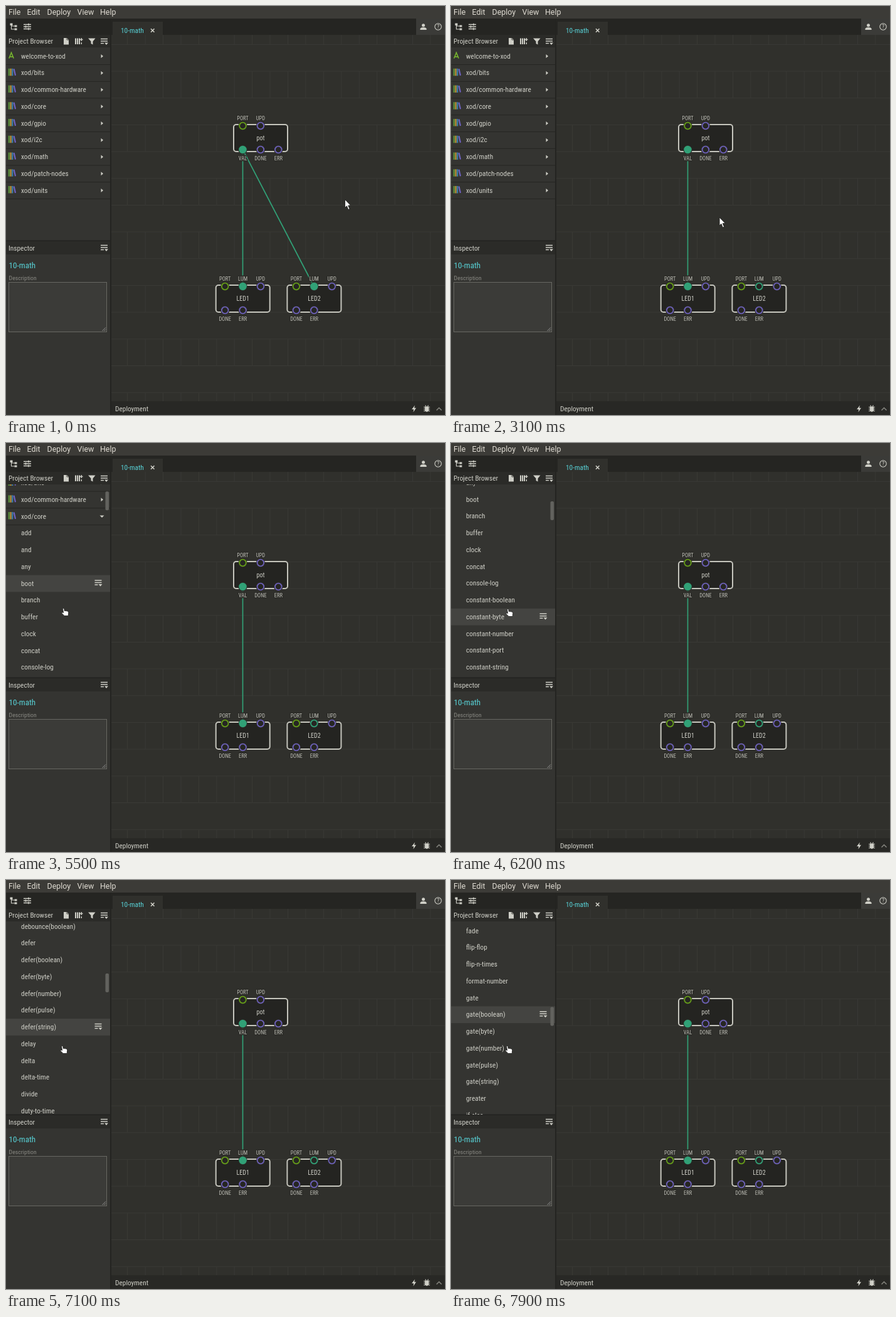
Write an HTML page that moves like this. It is 700 px wide and 652 px high and loops after 8000 ms.

```html
<!DOCTYPE html>
<html lang="en">
<head>
<meta charset="utf-8">
<title>Patch editor</title>
<style>
  html, body { margin: 0; width: 100%; height: 100%; overflow: hidden; background: #30302c; }
  svg { display: block; width: 700px; height: 652px; }
  text { font-family: "Roboto Condensed", Roboto, sans-serif; font-stretch: condensed; fill: #cfcfc7; white-space: pre; }
  .menu { font-family: Roboto, sans-serif; font-stretch: normal; fill: #dfdbd2; }
  .mid { text-anchor: middle; }
  .pin { fill: #bdbdb5; paint-order: stroke; stroke: #2d2d29; stroke-width: 3px; }
  .ico { fill: #cfcfc7; }
  .line { fill: none; stroke: #cfcfc7; stroke-width: 1.4; }
</style>
</head>
<body>
<svg id="stage" viewBox="0 0 700 652"></svg>
<script>
const ROW = 26.75, LOOP = 8000;
const GREEN = '#31a177', LIME = '#659d18', PURPLE = '#6c60b8', CYAN = '#58d3d8';

// Condensed text keeps the advance width of regular text of the nominal size.
const pen = document.createElement('canvas').getContext('2d');
const widthOf = font => (pen.font = font, pen.measureText('Deployment hardware').width);
const grow = widthOf('100px Roboto, sans-serif') /
  widthOf('condensed 100px "Roboto Condensed", Roboto, sans-serif');

const rect = (x, y, w, h, fill, more = '') =>
  `<rect x="${x}" y="${y}" width="${w}" height="${h}" fill="${fill}" ${more}/>`;
const path = (d, more = 'class="ico"') => `<path d="${d}" ${more}/>`;
const at = (x, y, body) => `<g transform="translate(${x} ${y})">${body}</g>`;
const text = (x, y, size, str, more = '') =>
  `<text x="${x}" y="${y}" font-size="${(size * grow).toFixed(2)}" ${more}>${str}</text>`;
const dot = (x, y, r, fill, more = '') => `<circle cx="${x}" cy="${y}" r="${r}" fill="${fill}" ${more}/>`;

const listIcon = path('M0 1h11M0 4.5h11M0 8h5', 'class="line"') + path('M6 7h6l-3 3.5z');
const books = path('M.8-6V5.5', 'stroke="#5f9a3c" stroke-width="2"') +
  path('M3.6-6V5.5', 'stroke="#c99f3a" stroke-width="2"') +
  path('M6.3-6V5.5', 'stroke="#3f86b5" stroke-width="2"') +
  path('M8.6-5.5L11 5', 'stroke="#7062c0" stroke-width="2.2"');
const compass = path('M4.5-6V-3M4-3.5L.8 4.5M5-3.5L8.2 4.5M2.5 1.5Q4.5 2.5 6.5 1.5',
  'fill="none" stroke="#79b92f" stroke-width="1.6"');

function grid() {
  let d = '';
  for (let y = 18.7; y < 640; y += 85.35) {
    d += `M168 ${y}H700M168 ${y + 42.7}H700`;
    for (let x = 193.7; x < 700; x += 28.42) d += `M${x} ${y}v42.7`;
  }
  return path(d, 'stroke="#3a3a36" fill="none"');
}

function node(x, y, name, top, bottom) {
  const pins = (list, py, ty) => list.map(([label, color, full], i) => {
    const px = x + 14.5 + i * 28.4;
    return dot(px, py, 7.2, '#2b2b27') +
      dot(px, py, 5.3, full ? color : '#262623', `stroke="${color}" stroke-width="1.8"`) +
      text(px, ty, 7.5, label, 'class="mid pin"');
  }).join('');
  return rect(x, y, 86, 43, '#242421', 'rx="4" stroke="#c5c5bd" stroke-width="2"') +
    text(x + 43, y + 25.3, 8.8, name, 'class="mid"') +
    pins(top, y + 2, y - 7.5) + pins(bottom, y + 40, y + 56.8);
}

const link = (x, color, width) =>
  path(`M377.5 229L${x} 447`, `stroke="${color}" stroke-width="${width}" fill="none"`);

function patch(t) {
  const exists = t < 2800, picked = t >= 1700, hot = exists && t >= 1300;
  const tint = picked ? CYAN : '#62cfa5';
  const led = (x, name, full) => node(x, 445, name,
    [['PORT', LIME], ['LUM', GREEN, full], ['UPD', PURPLE]], [['DONE', PURPLE], ['ERR', PURPLE]]);
  return link(377.5, GREEN, 1.7) + (exists && !hot ? link(491, GREEN, 1.7) : '') +
    node(363, 189, 'pot', [['PORT', LIME], ['UPD', PURPLE]],
      [['VAL', GREEN, true], ['DONE', PURPLE], ['ERR', PURPLE]]) +
    led(334.7, 'LED1', true) + led(448.4, 'LED2', exists) +
    (hot ? link(491, tint, 2) + dot(377.5, 229, 3, '#6fc8b0') + dot(491, 447, 3, '#6fc8b0') : '');
}

const typed = (name, kinds) => [name, ...kinds.split(' ').map(k => `${name}(${k})`)];
const libs = 'welcome-to-xod xod/bits xod/common-hardware xod/core xod/gpio xod/i2c xod/math xod/patch-nodes xod/units'.split(' ');
const opened = [
  ...libs.slice(0, 4),
  ...('add and any boot branch buffer clock concat console-log constant-boolean constant-byte ' +
    'constant-number constant-port constant-string continuously count cross cube cycle').split(' '),
  ...typed('debounce', 'boolean'), ...typed('defer', 'boolean byte number pulse string'),
  ...'delay delta delta-time divide duty-to-time'.split(' '),
  ...typed('equal', 'boolean byte string'), 'exp',
  ...'fade flip-flop flip-n-times format-number'.split(' '),
  ...typed('gate', 'boolean byte number pulse string'), 'greater', 'if-else', 'interpolate'
];

function list(t, scroll, handY) {
  const open = t >= 4400, rows = open ? opened : libs;
  const seen = Math.floor(scroll / 87.8) * 87.8; // hover lags behind scrolling
  const hover = open ? Math.floor((handY + 4 + seen - 66.6) / ROW) : -1;
  let out = '';
  rows.forEach((name, i) => {
    const y = 80 + i * ROW - scroll;
    if (y < 45 || y > 395) return;
    const group = !open || i < 4;
    if (group) {
      out += rect(0, y + 13, 166, 1, '#252522') + at(4, y - 1, i ? books : compass);
      out += at(153, y, path(open && i === 3 ? 'M-3.5-1.5h7L0 2z' : 'M-1.5-3v6L2 0z'));
    } else if (i === hover) {
      out += rect(0, y - 13.4, 166, ROW, '#444441') + at(141.5, y - 6, listIcon);
    }
    out += text(24, y + 3.6, 10, name);
  });
  if (scroll) out += rect(158.5, 72 + scroll * .119, 5.5, 30, '#62625e', 'rx="2"');
  return out;
}

function inspector(t) {
  if (t >= 1700 && t < 2800)
    return text(82.5, 418, 10, 'Links do not have any', 'class="mid"') +
      text(82.5, 430, 10, 'properties.', 'class="mid"');
  return text(4.5, 417.5, 11.6, '10-math', `style="fill:${CYAN}"`) +
    text(4.5, 436.5, 8.7, 'Description', 'style="fill:#888882"') +
    rect(4.5, 440.5, 156, 79, '#3b3b38', 'stroke="#686863"') +
    path('M153.5 518l5.5-5.5M156.5 518l2.5-2.5', 'stroke="#aaa" stroke-width=".8"');
}

// Value of a track of [time, value...] points at time t.
function track(t, points, ease = k => k) {
  const i = points.findIndex(p => p[0] > t);
  if (i === 0) return points[0].slice(1);
  if (i < 0) return points[points.length - 1].slice(1);
  const a = points[i - 1], b = points[i], k = ease((t - a[0]) / (b[0] - a[0]));
  return a.slice(1).map((v, j) => v + (b[j + 1] - v) * k);
}
const smooth = k => k * k * (3 - 2 * k);
const moves = [[400, 540, 308], [600, 466, 329], [700, 466, 329], [900, 446, 338], [1000, 446, 338],
  [1100, 441, 343], [1200, 441, 343], [1300, 439, 343], [3000, 439, 343], [3900, 106, 153],
  [4100, 95, 159], [4800, 95, 159], [5300, 92, 263], [5600, 92, 263], [6200, 91, 264], [7100, 90, 264]];
const scrolls = [[5300, 0], [5500, 43.2], [5800, 92], [6200, 177.2], [6600, 392], [7100, 648],
  [7300, 748], [7400, 748], [7900, 1095.7]];

function cursor(x, y) {
  const ink = 'fill="#fff" stroke="#1c1c1a" stroke-width=".8" stroke-linejoin="round"';
  return x > 167
    ? at(x, y, path('M.5.5V13.5L3.4 10.8 5.8 16.6 8 15.6 5.6 10.2 9.4 9.8Z', ink))
    : at(x - 4, y, path('M3.2.5Q4.8.2 5 2V4.3L10 5Q12 5.5 11.7 7.5L11.2 12.5H5L.8 8.2Q.6 6.8 2.2 7L3.6 7.6 2.6 2Q2.5.8 3.2.5Z', ink));
}

const bug = path('M-3-3.5h6v6.5q-3 4-6 0z') +
  path('M-5-2.5h10M-5 .5h10M-5 3.5h10M-2.5-5.5l1.5 2M2.5-5.5l-1.5 2', 'class="line" style="stroke-width:1.2"');

const chrome =
  rect(0, 0, 700, 20, '#3c3b37') + rect(0, 20, 700, 26, '#252522') +
  rect(170, 25, 80, 21, '#30302c') + rect(654, 20, 46, 26, '#3b3b38') +
  [['File', 4], ['Edit', 33.5], ['Deploy', 65.5], ['View', 113.5], ['Help', 150]].map(([s, x]) =>
    `<text class="menu" x="${x}" y="14.3" font-size="12.4">${s}</text>`).join('') +
  text(183, 42.7, 10, '10-math', `style="fill:${CYAN}"`) +
  path('M231 36.3l5.5 5.5M236.5 36.3l-5.5 5.5', 'class="line" style="stroke-width:1.6"') +
  at(665.5, 33, dot(0, -2.3, 2.5, '#cfcfc7') + path('M-5 5V3.3Q-4 1 0 1T5 3.3V5z')) +
  dot(689, 33, 5.2, 'none', 'stroke="#cfcfc7" stroke-width="1.1"') + text(689, 36, 7.8, '?', 'class="mid"') +
  rect(168, 630, 532, 22, '#282825') + text(174, 646.3, 10, 'Deployment') +
  at(650.5, 642, path('M1.5-5.5L-3.5 1H-.5L-1 5.5 3.5-1.2H.5z')) + at(671, 642, bug) +
  path('M686.5 644.5l4-4 4 4', 'fill="none" stroke="#85857f" stroke-width="1.5"');

const sidebar =
  rect(0, 46, 166, 606, '#343431') + rect(166, 20, 2, 632, '#242421') +
  rect(0, 46, 166, 20, '#2b2b28') + rect(0, 374, 166, 22, '#2b2b28') + rect(0, 373.5, 166, 1.5, '#222220') +
  path('M6.5 27.5h4v3.5h-4zM13.5 30.5h4v3h-4zM13.5 35.5h4v3h-4z') +
  path('M8.5 31v6h5M8.5 32h5', 'class="line" style="stroke-width:1.1"') +
  path('M28 29.5h12M28 33h12M28 36.5h12M36 27.8v3.4M31.5 31.3v3.4M36 34.8v3.4', 'class="line"') +
  text(4, 60.3, 10, 'Project Browser') + text(4, 389.5, 10, 'Inspector') +
  path('M92 51h5l3 3v7.5h-8z') + path('M97 51v3h3', 'stroke="#2b2b28" fill="none" stroke-width=".8"') +
  path('M111 51.5v9.5M114 51.5v9.5M117 51.5v9.5', 'class="line" style="stroke-width:2"') +
  path('M120.3 51v5M118 53.5h4.5M120.3 58v3', 'class="line"') +
  path('M131 51.5h11.5L138.5 56.5v5l-3-1.5v-3.5z') +
  at(151, 51.5, listIcon) + at(151, 380.5, listIcon);

document.getElementById('stage').innerHTML =
  '<clipPath id="pane"><rect y="66" width="166" height="308"/></clipPath>' +
  rect(0, 0, 700, 652, '#30302c') + grid() + '<g id="patch"></g>' + chrome + sidebar +
  '<g id="list" clip-path="url(#pane)"></g><g id="inspector"></g><g id="cursor"></g>';

const layers = {};
function put(id, markup) {
  if (layers[id] === markup) return;
  layers[id] = markup;
  document.getElementById(id).innerHTML = markup;
}

function draw(now) {
  const t = Math.floor(now % LOOP / 100) * 100;
  const [x, y] = track(t, moves, t >= 3000 && t < 3900 ? smooth : undefined);
  const [scroll] = track(t, scrolls);
  put('patch', patch(t));
  put('list', list(t, scroll, y));
  put('inspector', inspector(t));
  put('cursor', cursor(x, y));
}

let start;
function tick(now) {
  start ??= now;
  draw(now - start);
  requestAnimationFrame(tick);
}
draw(0);
requestAnimationFrame(tick);
</script>
</body>
</html>
```
